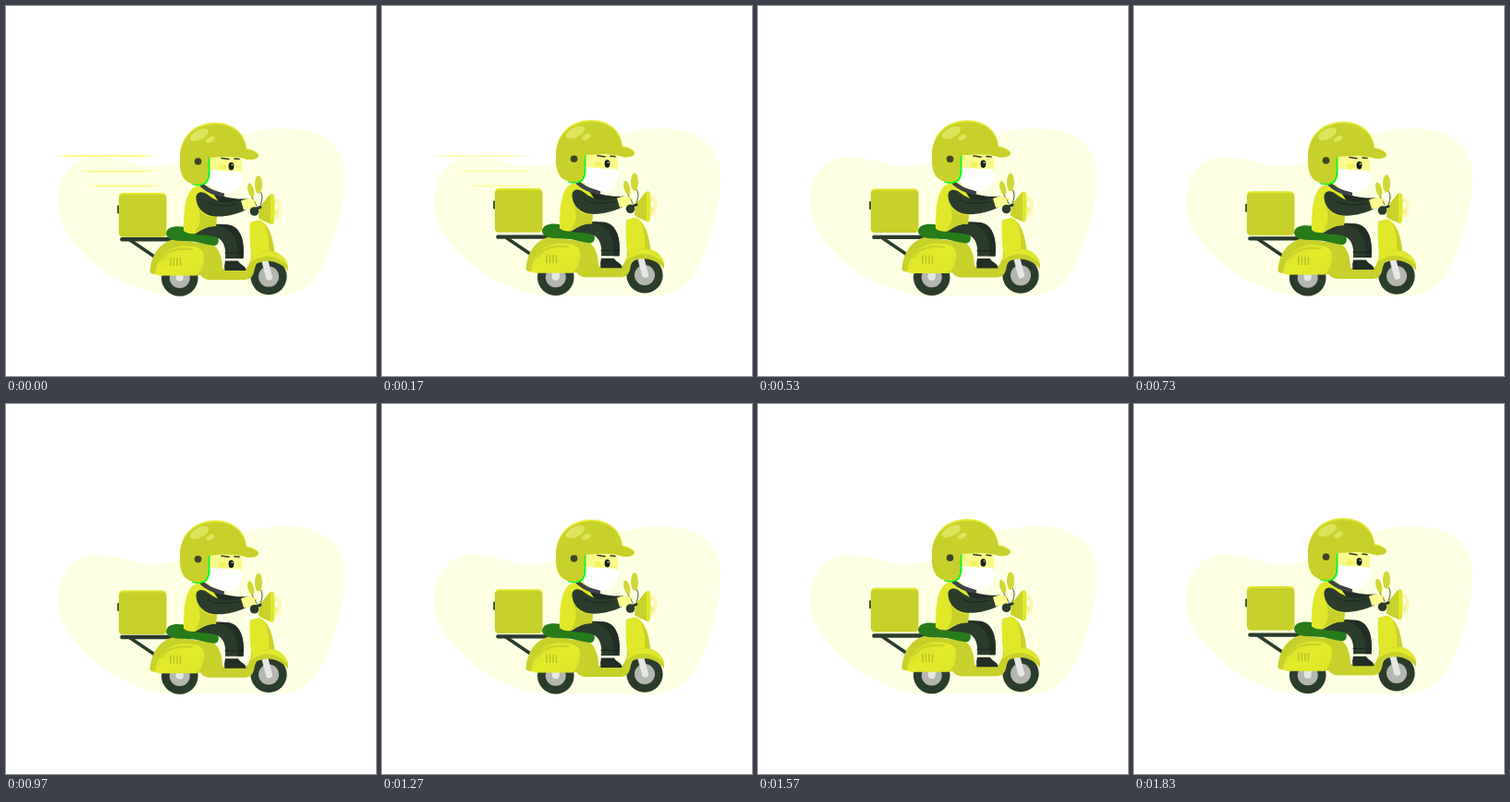
Write an HTML page that moves like this. It is 400 px wide and 400 px high and loops after 1.93 s.

```html
<!DOCTYPE html>
<html lang="en">
<head>
<meta charset="utf-8">
<title>Scooter courier</title>
<style>
  html, body { margin: 0; width: 100%; height: 100%; overflow: hidden; background: #fff; }
  svg { display: block; width: 100vw; height: 100vh; }
  .lime { fill: #c8d02b; }
  .bright { fill: #e1e82a; }
  .dark { fill: #2b3c2c; }
  .black { fill: #222d25; }
  .skin { fill: #fafa8e; }
  .line { fill: none; stroke-linecap: round; stroke-linejoin: round; }
</style>
</head>
<body>
<svg viewBox="0 0 400 400">
  <defs>
    <linearGradient id="streak">
      <stop offset="0" stop-color="#fafb85" stop-opacity="0"/>
      <stop offset=".15" stop-color="#fafb85"/>
      <stop offset=".8" stop-color="#fafb85"/>
      <stop offset="1" stop-color="#fafb85" stop-opacity="0"/>
    </linearGradient>
    <linearGradient id="cowl" x1="0" y1="0" x2="1" y2="1">
      <stop offset="0" stop-color="#d3da2a"/>
      <stop offset=".5" stop-color="#e4eb2a"/>
      <stop offset="1" stop-color="#dce32a"/>
    </linearGradient>
  </defs>

  <path fill="#fdffe3" d="M56 213C56 183 73 163 97 163C125 163 138 174 165 173C205 171 235 133 300 132C345 132 366 152 366 185C365 215 358 252 342 282C330 303 318 313 295 313.5H180C130 308 100 286 78 261C64 246 56 230 56 213Z"/>

  <g id="streaks" fill="url(#streak)">
    <rect x="52" y="161" width="114" height="2"/>
    <rect x="79" y="177.7" width="87" height="2"/>
    <rect x="90" y="193.4" width="80" height="2"/>
  </g>

  <g id="rearWheel">
    <circle class="dark" cx="187.8" cy="294" r="19.8"/>
    <circle fill="#b4b6b0" cx="187.8" cy="294" r="11"/>
    <path class="line" stroke="#e6e7e4" stroke-width="8" d="M187.8 285V293.5"/>
  </g>
  <g id="frontWheel">
    <circle class="dark" cx="284" cy="292.6" r="19.6"/>
    <circle fill="#b4b6b0" cx="284" cy="292.6" r="11"/>
  </g>

  <g id="body">
    <g id="scooter">
      <path class="line" stroke="#2b3c2c" stroke-width="3.6" d="M134 253L162 272"/>
      <path class="line" stroke="#2b3c2c" stroke-width="4.4" d="M125.5 252.3H178"/>

      <path class="line" stroke="#e6e7e4" stroke-width="7" d="M280 276L284.5 293"/>
      <path class="lime" d="M206 256L224 258C232 264 234 275 234 284H258C265 282 266 272 264 256V234L274 231.500C284 236 288 248 290 265C278 266 270 275 268 288C266 294 263 296 257 296H222C216 296 212 294 210 290Z"/>
      <path class="bright" d="M264 234L274 231.500C283 236 288 247 289 262C283 268 274 269 266 272C264 260 263 248 264 234Z"/>
      <path class="lime" d="M280 236C286 244 289 254 290 266L284 267C285 254 283 245 280 236Z"/>
      <path class="lime" d="M261 285C263 271 275 264 287 265C299 267 306 276 305 287C299 279 290 275 280 276C272 277 267 280 261 285Z"/>
      <path class="bright" d="M262 279C267 269 277 265 287 265.500C297 267 304 274 305 281C297 273 288 270 279 271C272 272 267 275 262 279Z"/>

      <path class="lime" d="M155.500 287C157 269 165 257 181 252L214 257L216 291L162 290Q156 290 155.500 287Z"/>
      <path fill="url(#cowl)" d="M161 290C164 271 174 261 191 259C205 259 214 262 214 270C214 280 211 288 206 291.500H166Z"/>
      <path class="line" stroke="#c8d02b" stroke-width="2" d="M168 274C174 265 186 261 201 263"/>
      <path class="line" stroke="#bac426" stroke-width="1.6" d="M178 272.500V280.500M181.500 272.500V280.500M185 272.500V280.500M188.500 272.500V280.500"/>
      <path fill="#277b1b" d="M173 246C174 237 187 237 198 240L227 248C231 250 231 258 226 259C218 259 210 255 200 254.500C190 254 174 255 173 246Z"/>
    </g>

    <g id="rider">
      <path class="dark" d="M197 243C205 235 228 235 240 236.500C253 238.500 258.500 252 256.500 273H237C238 262 236 254 228 250C216 246.500 204 249 197 243Z"/>
      <path class="black" d="M228 236.500H240C253 238.500 258.500 252 256.500 273H250.500C251.500 254 246 241 228 236.500Z"/>
      <path class="line" stroke="#1d261f" stroke-width="1.2" d="M237 267H256.500"/>
      <path class="black" d="M237 275.500H251C253 280.500 259 279.500 259.500 286H236.500Q235.500 281 237 275.500Z"/>

      <path class="bright" d="M207 194.500C195 197 192 216 192 243Q197 247 205 246Q218 237 227 238L230 210L218 194Z"/>
      <path class="lime" d="M207 216C212 226 219 229 228 228L227 238Q214 238 203 246Q214 234 207 216Z"/>
      <path class="black" d="M224 203C236 206 249 210 262 208V214L235 219Z"/>
      <path class="line" stroke="#3d4348" stroke-width="4.5" d="M212 194Q221 202 234 204"/>
      <path class="dark" d="M205.500 208C205 201 212 199 218 204C226 210 234 214 244 212L258 209.500L260 220C248 226 234 229 222 227C211 224 206 216 205.500 208Z"/>
      <path class="line" stroke="#1d261f" stroke-width="1" d="M219 212Q230 219 250 214"/>
      <path class="skin" d="M254 210.500L263 207.500L272 211L269 219L257 220.500Z"/>
    </g>

    <g id="handlebar">
      <path class="line" stroke="#46513b" stroke-width="1" d="M274 200C279 204 277 211 274 218M265 205L271 216"/>
      <ellipse cx="273" cy="193" rx="4" ry="9.800" fill="#d0d735"/>
      <ellipse cx="264.700" cy="199.200" rx="3.200" ry="7.800" transform="rotate(-15 264.700 199.200)" fill="#d0d735"/>
      <ellipse cx="291.500" cy="218.700" rx="6.500" ry="11.500" fill="#faf9bd"/>
      <ellipse cx="290.500" cy="218.700" rx="4.500" ry="8.500" fill="#f6f48f"/>
      <ellipse cx="292.500" cy="216.500" rx="1.300" ry="4" fill="#fffff0"/>
      <path class="lime" d="M274 216C280 213 283 203 288 203Q290 204 290 209V230Q290 236 287 236C281 233 278 233 273 229Z"/>
      <path class="bright" d="M286 204Q290 202 290 209V230Q290 237 286 235Z"/>
      <circle class="dark" cx="268.500" cy="222" r="4.800"/>
      <path class="line" stroke="#2b3c2c" stroke-width="3" d="M268 220L275 217.500"/>
      <path class="skin" d="M257 211L268 209L270 216L258 219Z"/>
    </g>

    <g id="head">
      <path class="skin" d="M218 162H254Q256 172 255 182L218 185Z"/>
      <ellipse cx="234" cy="174" rx="4" ry="3" fill="#f2f35f"/>
      <path fill="#fff" d="M218 176C230 179 242 178 253 179Q258 184 254 192Q249 201 241 203Q230 204 217 191Z"/>
      <ellipse cx="243.500" cy="173.200" rx="2.900" ry="4.200" fill="#172018"/>
      <circle cx="244.500" cy="171.800" r=".8" fill="#fff"/>
      <path class="line" stroke="#303a22" stroke-width="1.500" d="M233 164.500L241 165.600M247 165L252 165.500"/>
      <path class="line" stroke="#1cf51c" stroke-width="2.500" d="M219.500 165C218 174 222 184 216 191Q209 195 202 192"/>
      <path class="bright" d="M188 166C187 142 203 126 226 126C246 126 259 138 260 154C266 155 272 158 273 161C273 165 267 166.500 261 166C248 161 233 163 219 164C217 172 220 182 216 189.500C212 193 207 193.500 202 192C191 190 188 180 188 166Z"/>
      <path class="lime" d="M188 168C187 144 203 128 226 128C246 128 258 140 259.500 155C266 156 272 159 273 161.500C273 165 267 166.500 261 166C248 161 233 163 219 164C217 172 220 182 216 189.500C212 193 207 193.500 202 192C191 190 188 180 188 168Z"/>
      <ellipse cx="209" cy="139.300" rx="11" ry="5.400" transform="rotate(-27 209 139.300)" fill="#dde35b"/>
      <ellipse cx="220.800" cy="144.400" rx="5" ry="2.800" transform="rotate(-27 220.800 144.400)" fill="#dde35b"/>
      <circle cx="207.600" cy="168" r="3.800" fill="#3d4528"/>
    </g>
  </g>

  <g id="box">
    <rect class="dark" x="120.300" y="215.500" width="4" height="9" rx="1"/>
    <rect class="bright" x="122" y="202" width="51.300" height="47.600" rx="4.500"/>
    <path class="lime" d="M122 208Q122 204 126 204H169Q173.300 204 173.300 208V245Q173.300 249.600 169 249.600H126.500Q122 249.600 122 245Z"/>
  </g>
</svg>
<script>
  const LOOP = 1930, STEP = 1000 / 30, LAST_STEP = 55, BOB_STEPS = 10;
  const lift = { box: 5.1, body: 2.7, frontWheel: 1.6, rearWheel: 0.8 };
  const fadeTimes = [390, 460, 420];
  const streaks = [...document.getElementById('streaks').children];
  const parts = Object.entries(lift).map(([id, height]) => [document.getElementById(id), height]);

  function render(ms) {
    // The 4 ms lead keeps step changes on rounded 10 ms ticks.
    const step = Math.min(LAST_STEP, Math.floor((ms + 4) / STEP));
    const bob = (1 - Math.cos(step / BOB_STEPS * 2 * Math.PI)) / 2;
    for (const [part, height] of parts) {
      part.setAttribute('transform', `translate(0 ${(-height * bob).toFixed(3)})`);
    }
    streaks.forEach((streak, i) => {
      streak.setAttribute('opacity', Math.max(0, 1 - step * STEP / fadeTimes[i]));
    });
  }

  const start = performance.now();
  function tick() {
    render((performance.now() - start) % LOOP);
    requestAnimationFrame(tick);
  }
  render(0);
  requestAnimationFrame(tick);
</script>
</body>
</html>
```
